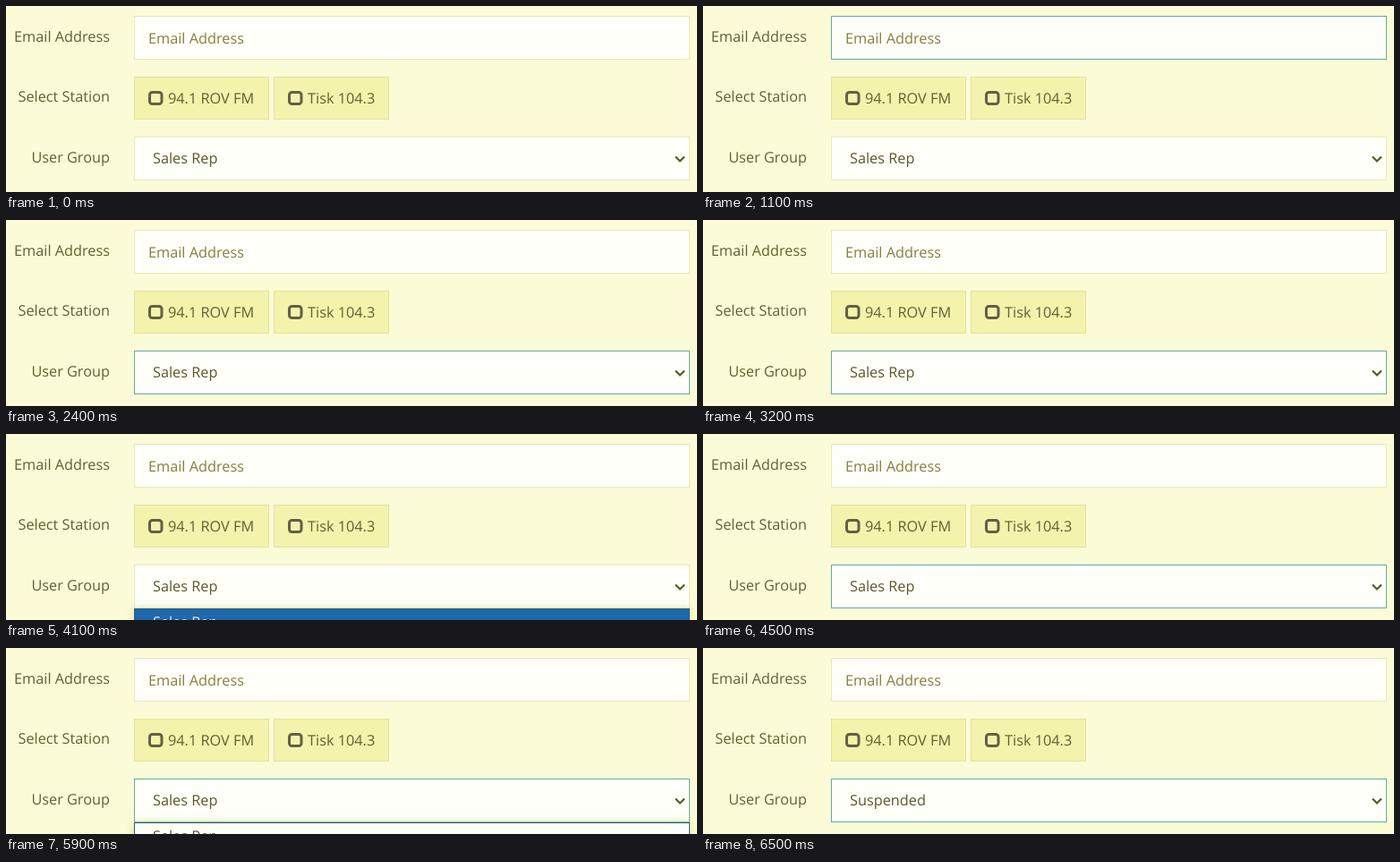
These frames come from a looping animation (772 px wide and 208 px high, 8000 ms). An HTML page:

```html
<!DOCTYPE html>
<html lang="en">
<head>
<meta charset="utf-8">
<title>User form</title>
<style>
  html, body { margin: 0; width: 100%; height: 100%; overflow: hidden; background: #fbfbd8; }
  svg { display: block; font: 16.3px "Open Sans", sans-serif; fill: #626030; text-rendering: geometricPrecision; }
  .label { text-anchor: end; }
  .field { fill: #fffffa; stroke: #e8e8c0; }
  .button { fill: #f3f3ac; stroke: #e2e2a0; }
  .button.hover { fill: #ebeb9e; }
  .box { fill: none; stroke: #626048; stroke-width: 3; }
  .focus { fill: none; stroke: #62ab9f; }
  .placeholder { fill: #82803c; }
  .value { fill: #5a5826; }
  #list { filter: drop-shadow(0 0 5px #d8d87ccc); }
</style>
</head>
<body>
<svg width="772" height="208" viewBox="0 0 772 208">
  <g class="label">
    <text x="116" y="40">Email Address</text>
    <text x="116" y="107">Select Station</text>
    <text x="116" y="175">User Group</text>
  </g>

  <rect class="field" x="143.5" y="11.5" width="620" height="48"/>
  <rect class="focus" id="emailFocus" x="143.5" y="11.5" width="620" height="48"/>
  <text class="placeholder" x="159" y="42">Email Address</text>

  <rect class="button" id="first" x="143.5" y="79.5" width="150" height="47"/>
  <rect class="box" x="160.5" y="96.5" width="13.5" height="13" rx="3"/>
  <text x="181" y="109">94.1 ROV FM</text>
  <rect class="button" id="second" x="299.5" y="79.5" width="128" height="47"/>
  <rect class="box" x="316.5" y="96.5" width="13.5" height="13" rx="3"/>
  <text x="337" y="109">Tisk 104.3</text>

  <rect class="field" x="143.5" y="146.5" width="620" height="48"/>
  <rect class="focus" id="groupFocus" x="143.5" y="146.5" width="620" height="48"/>
  <text class="value" id="group" x="164" y="176"></text>
  <path d="M748 168.5l5 5 5-5" fill="none" stroke="#5a5826" stroke-width="2.2"/>

  <g id="list">
    <rect id="option" x="143.5" y="195.5" width="620" height="40" stroke="#2b6488"/>
    <text id="optionText" x="164" y="216">Sales Rep</text>
  </g>
</svg>
<script>
  const LOOP = 8000, STEP = 100;
  const el = id => document.getElementById(id);
  const ramp = (t, start, length) => Math.min(1, Math.max(0, (t - start) / length));
  const within = (t, ...spans) => spans.some(([from, to]) => t >= from && t < to);

  function draw() {
    const t = Math.floor(performance.now() % LOOP / STEP) * STEP;
    const highlighted = t < 5200;

    el('emailFocus').style.opacity = ramp(t, 800, 300) - ramp(t, 1300, 300);
    el('groupFocus').style.opacity =
      ramp(t, 2200, 200) - ramp(t, 3200, 200) + ramp(t, 4100, 200);
    el('group').textContent = t < 6500 ? 'Sales Rep' : 'Suspended';

    el('first').classList.toggle('hover', within(t, [1500, 1800]));
    el('second').classList.toggle('hover', within(t, [1800, 2100]));

    el('list').style.display =
      within(t, [4100, 4500], [4900, 5500], [5900, 6500]) ? '' : 'none';
    el('option').style.fill = highlighted ? '#1f68ac' : '#fffffa';
    el('optionText').style.fill = highlighted ? '#d4f0f4' : '#5a5826';

    requestAnimationFrame(draw);
  }
  draw();
</script>
</body>
</html>
```
